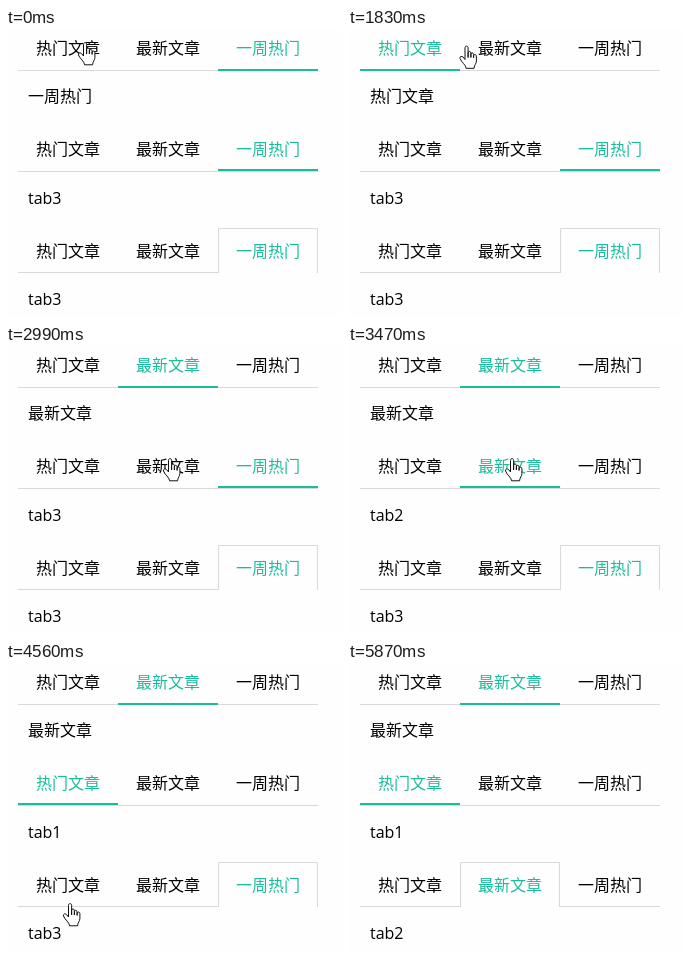
Recreate the animation shown at these times as an HTML page. Size 336 by 289 pixels, loop 6240 ms.

```html
<!DOCTYPE html>
<html lang="zh-CN">
<head>
<meta charset="utf-8">
<title>Tabs</title>
<style>
  html, body { margin: 0; width: 100%; height: 100%; overflow: hidden; background: #fefefe; }
  svg { display: block; width: 336px; height: 289px; }
  text { font: 16px "Open Sans", "Noto Sans CJK SC", "Noto Sans CJK", sans-serif; fill: #000; }
  text.active { fill: #1abc9c; }
  .line { fill: #d9d9d9; }
  .bar { fill: #1abc9c; }
</style>
</head>
<body>
<svg id="stage" viewBox="0 0 336 289"></svg>
<script>
const LOOP = 6240;
const STEP = 115;        // the screen refreshes this often (ms)
const TRAVEL = 2 * STEP; // time the pointer needs from stop to stop
const LEFT = 12, TAB = 100, ROW = 101;
const LABELS = ["热门文章", "最新文章", "一周热门"];
const PANES = ["tab1", "tab2", "tab3"];

const CLICKS = [
  { at: 1340, row: 0, tab: 0 },
  { at: 2170, row: 0, tab: 1 },
  { at: 3110, row: 1, tab: 1 },
  { at: 4200, row: 1, tab: 0 },
  { at: 5050, row: 2, tab: 0 },
  { at: 5640, row: 2, tab: 1 }
];

// Where the pointer rests, and when it gets there.
const STOPS = [
  { at: 0, x: 72, y: 14 },
  { at: 1930, x: 151, y: 21 },
  { at: 2750, x: 157, y: 113 },
  { at: 3700, x: 69, y: 116 },
  { at: 4200, x: 73, y: 124 },
  { at: 4560, x: 57, y: 241 },
  { at: 4810, x: 55, y: 226 },
  { at: 5400, x: 150, y: 228 },
  { at: 5870, x: 250, y: 300 }
];

const stage = document.getElementById("stage");
const clamp = v => Math.min(1, Math.max(0, v));
const mix = (a, b, p) => a + (b - a) * p;
const tick = ms => Math.floor(ms / STEP) * STEP;

function ease(ms) {
  const p = clamp(ms / 300);
  return p < 0.5 ? 4 * p ** 3 : 1 - 4 * (1 - p) ** 3;
}

function setAttrs(el, attrs) {
  for (const key in attrs) el.setAttribute(key, attrs[key]);
  return el;
}

function add(tag, attrs, content = "") {
  const el = document.createElementNS("http://www.w3.org/2000/svg", tag);
  el.textContent = content;
  return stage.appendChild(setAttrs(el, attrs));
}

const addBar = y => add("rect", { class: "bar", y, height: 2 });

function slideBar(bar, from, to, age) {
  setAttrs(bar, { x: LEFT + TAB * mix(from, to, ease(age - 15)), width: TAB });
}

function growBar(bar, from, to, age) {
  const width = TAB * ease(age + 168);
  setAttrs(bar, { x: LEFT + TAB * (to + 0.5) - width / 2, width });
}

function moveBox(box, from, to) {
  const x = LEFT + TAB * to + 0.5;
  setAttrs(box, { d: `M${x} 245V200.5H${x + TAB - 1}V245` });
}

function addRow(index, { names, labelY, paneY, addMarker, place }) {
  const top = index * ROW;
  add("rect", { class: "line", x: LEFT, y: top + 42, width: 3 * TAB, height: 1 });
  const marker = addMarker(top);
  const labels = LABELS.map((label, n) =>
    add("text", { x: LEFT + n * TAB + 18, y: top + labelY }, label));
  const pane = add("text", { x: 22, y: top + paneY });

  return time => {
    const past = CLICKS.filter(c => c.row === index && c.at <= time);
    const { at, tab } = past.at(-1) ?? { at: -LOOP, tab: 2 };
    const from = past.at(-2)?.tab ?? 2;
    place(marker, from, tab, tick(time - at));
    labels.forEach((label, n) => label.classList.toggle("active", n === tab));
    pane.textContent = names[tab];
  };
}

const rows = [
  { names: LABELS, labelY: 26, paneY: 74, addMarker: top => addBar(top + 41), place: slideBar },
  { names: PANES, labelY: 26, paneY: 75, addMarker: top => addBar(top + 40), place: growBar },
  { names: PANES, labelY: 27, paneY: 75, place: moveBox,
    addMarker: () => add("path", { fill: "#fefefe", stroke: "#d9d9d9" }) }
].map((row, i) => addRow(i, row));

const hand = add("path", {
  fill: "#fff", stroke: "#111", "stroke-linejoin": "round",
  d: "M5.5 14V2.4C5.5 0 8.6 0 8.6 2.4V12V7.2C8.8 5.4 11.2 5.6 11.4 7.4V12V8.6" +
     "C11.6 6.8 13.9 7 14.1 8.8V12.4V10C14.3 8.6 16.9 8.8 16.9 10.6V15.5" +
     "C16.9 18.5 14.8 19 14.6 22.8H6.6C6.2 19 2 17 .5 13C0 11 2.2 10.2 3.6 11.6Z"
});

function movePointer(time) {
  const next = STOPS.findIndex(stop => stop.at > time);
  const to = STOPS.at(next);
  const from = next > 0 ? STOPS[next - 1] : to;
  const p = clamp(1 + tick(time - to.at) / TRAVEL);
  hand.setAttribute("transform", `translate(${mix(from.x, to.x, p)} ${mix(from.y, to.y, p)})`);
}

function draw(time) {
  rows.forEach(update => update(time));
  movePointer(time);
}

const start = performance.now();
function frame() {
  draw((performance.now() - start) % LOOP);
  requestAnimationFrame(frame);
}
frame();
</script>
</body>
</html>
```
